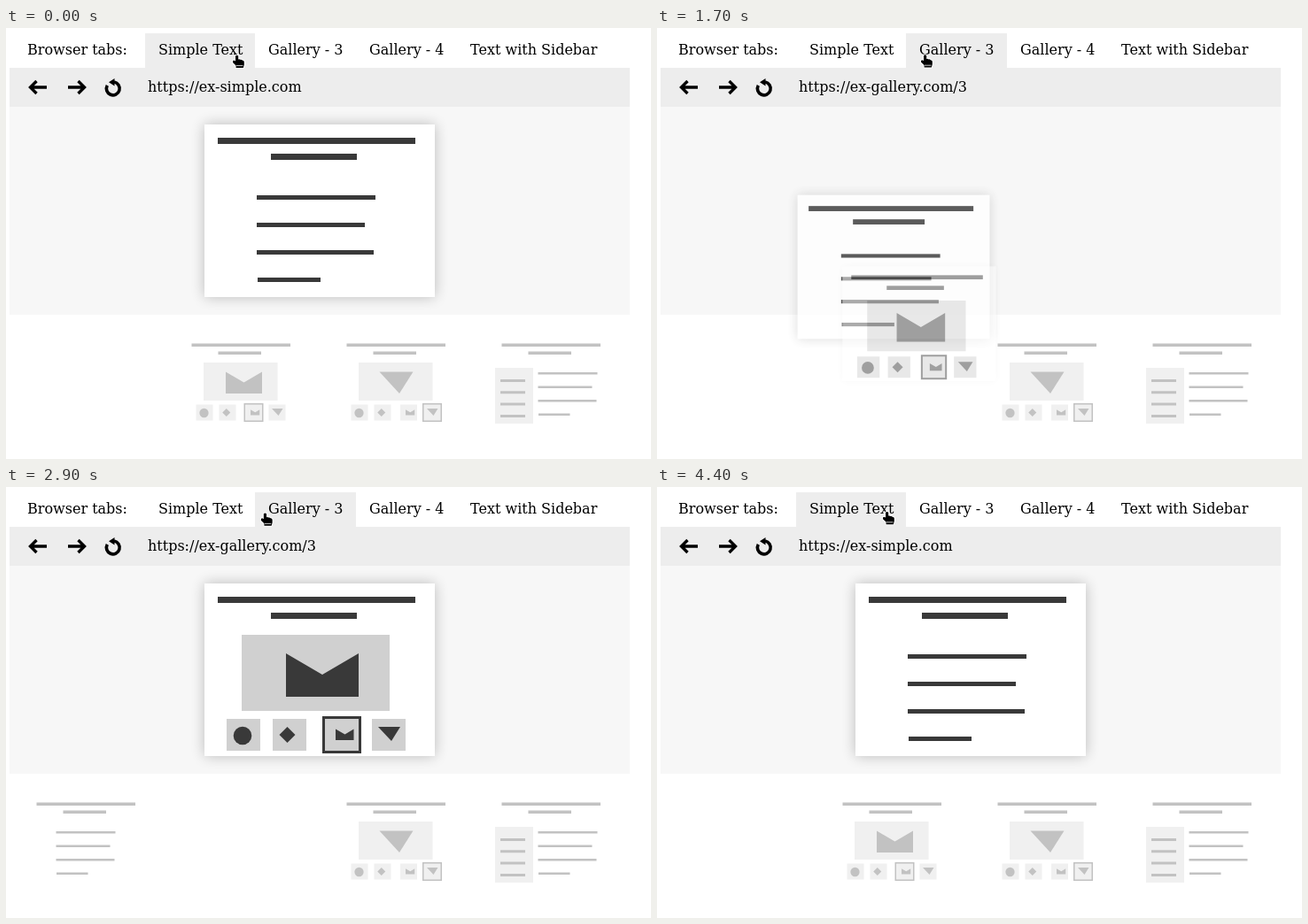
An HTML page for the animation above (5200 ms loop, 728x487 px).

```html
<!DOCTYPE html>
<html lang="en">
<head>
<meta charset="utf-8">
<title>Browser tabs</title>
<style>
  html, body { margin: 0; width: 100%; height: 100%; overflow: hidden; background: #fff; }
  svg, span { position: absolute; left: 0; top: 0; }
  svg { width: 728px; height: 487px; }
  span { font: 16px/20px "DejaVu Serif", "Noto Serif", serif; color: #000; white-space: pre;
    text-rendering: optimizeSpeed; }
</style>
</head>
<body>
<svg viewBox="0 0 728 487">
  <defs>
    <filter id="blur" x="-20%" y="-20%" width="140%" height="140%">
      <feGaussianBlur stdDeviation="8"/>
    </filter>
  </defs>
  <rect id="tab" y="6" height="39" fill="#ededed"/>
  <rect x="4" y="45" width="700" height="44" fill="#ededed"/>
  <rect x="4" y="89" width="700" height="235" fill="#f7f7f7"/>
  <g fill="none" stroke="#000" stroke-width="3.4">
    <path d="M46 67H28M34.5 60L27.5 67L34.5 74"/>
    <path d="M70 67H88M81.5 60L88.5 67L81.5 74"/>
    <path d="M114.3 64.8A7.4 7.4 0 1 0 122 61.1" stroke-width="3.6"/>
    <path d="M122.5 57V65.5L116 61.2Z" fill="#000" stroke="none"/>
  </g>
  <g id="pages"></g>
</svg>
<span style="left:24px;top:15px">Browser tabs:</span>
<span style="left:172px;top:15px">Simple Text</span>
<span style="left:296px;top:15px">Gallery - 3</span>
<span style="left:410px;top:15px">Gallery - 4</span>
<span style="left:524px;top:15px">Text with Sidebar</span>
<span id="url" style="left:160px;top:57px"></span>
<svg viewBox="0 0 728 487">
  <g id="cursor">
    <path d="M6 3.2Q7.6 1.4 9.2 3.2V7Q10.6 6.4 11.6 7.4Q13 7 13.8 8.2Q15.8 8.2 15.8 10V13L14.8 16.6H6.6V14L3 10.6Q2.6 8.2 4.4 8.2L6 9Z"
      fill="#000" stroke="#fff" stroke-width="2" paint-order="stroke" stroke-linejoin="round"/>
    <path d="M7 14.2H14.4" fill="none" stroke="#fff" stroke-width=".8"/>
  </g>
</svg>
<script>
const LOOP = 5200, DARK = '#393939', LIGHT = '#d0d0d0';
const $ = id => document.getElementById(id);

const rect = (x, y, w, h, fill = DARK) =>
  `<rect x="${x}" y="${y}" width="${w}" height="${h}" fill="${fill}"/>`;
const poly = points => `<polygon points="${points}" fill="${DARK}"/>`;

const heading = rect(15, 15, 223, 7) + rect(75, 33, 97, 7);
const lines = x => [134, 122, 132, 71]
  .map((w, i) => rect(x + (i === 3 ? 1 : 0), 80 + 31 * i, w, 5)).join('');

function gallery(chosen) {
  const thumbs = [25, 77, 136, 189].map((x, i) => {
    if (i !== chosen) return rect(x, 153, 38, 36, LIGHT);
    const left = i === 2 ? 134.5 : 187.5;
    return `<rect x="${left}" y="151.5" width="41" height="39" fill="${LIGHT}" stroke="${DARK}" stroke-width="3"/>`;
  }).join('');
  const hero = chosen === 2
    ? poly('92,79 133,103 174,79 174,128 92,128')
    : poly('89,79 165,79 134,128');
  return rect(42, 58, 167, 86, LIGHT) + hero + thumbs +
    `<circle cx="43" cy="172" r="10.3" fill="${DARK}"/>` +
    poly('93.5,162 102.5,171 93.5,180 84.5,171') +
    poly('148,164.5 158.5,170.5 168.5,164.5 168.5,177 148,177') +
    poly('196,162 221,162 211,178');
}

const sidebar = rect(0, 70, 86, 126, LIGHT) +
  [96, 122.5, 149, 176].map(y => rect(12, y, 56, 6)).join('');

const bodies = [lines(59), gallery(2), gallery(3), sidebar + lines(97)];
$('pages').innerHTML = bodies.map(body =>
  `<g><rect width="260" height="195" filter="url(#blur)"/>` +
  `${rect(0, 0, 260, 195, '#fff')}${heading}${body}</g>`).join('');
const pages = [...$('pages').children];

// move and fade: 0 = thumbnail in the row, 1 = open in the browser
function place(i, move, fade) {
  const mix = (a, b, p) => a + (b - a) * p;
  const page = pages[i];
  page.setAttribute('transform',
    `translate(${mix(27 + 175 * i, 224, move)} ${mix(349, 109, move)}) scale(${mix(.5, 1, move)})`);
  page.setAttribute('opacity', mix(.3, 1, fade));
  page.firstChild.setAttribute('opacity', .24 * fade);
}

const path = [
  [400, 253, 28.4], [500, 255, 28.4], [1000, 290, 28], [1200, 295, 28],
  [2800, 295, 28], [3100, 264.5, 25.5], [3200, 264.5, 25.5], [3500, 252, 25.6]
];

function along(t) {
  const next = path.findIndex(k => k[0] > t);
  if (next === 0) return path[0].slice(1);
  if (next < 0) return path[path.length - 1].slice(1);
  const a = path[next - 1], b = path[next];
  const f = (t - a[0]) / (b[0] - a[0]);
  return [1, 2].map(i => a[i] + (b[i] - a[i]) * f);
}

// cubic-bezier(.42, 0, .58, 1), solved by bisection
function easeInOut(x) {
  if (x <= 0) return 0;
  if (x >= 1) return 1;
  const curve = (u, a, b) => 3 * a * u * (1 - u) ** 2 + 3 * b * u * u * (1 - u) + u ** 3;
  let lo = 0, hi = 1;
  for (let i = 0; i < 24; i++) {
    const mid = (lo + hi) / 2;
    if (curve(mid, .42, .58) < x) lo = mid; else hi = mid;
  }
  return curve(lo, 0, 1);
}

function draw(time) {
  // the picture advances in steps, coarser for the way back
  const step = time < 4000 ? 100 : 200;
  const t = Math.floor(time / step) * step;
  const swap = length => easeInOut((t - 1548) / length) - easeInOut((t - 3915) / length);
  const move = swap(380), fade = swap(430);
  place(0, 1 - move, 1 - fade);
  place(1, move, fade);

  const onGallery = t >= 1700 && t < 4200;
  $('tab').setAttribute('x', onGallery ? 281 : 157);
  $('tab').setAttribute('width', onGallery ? 114 : 124);
  $('url').textContent = t >= 1600 && t < 4000
    ? 'https://ex-gallery.com/3' : 'https://ex-simple.com';
  $('cursor').setAttribute('transform', `translate(${along(t).join(' ')})`);
}

place(2, 0, 0);
place(3, 0, 0);
const start = performance.now();
function tick() {
  draw((performance.now() - start) % LOOP);
  requestAnimationFrame(tick);
}
tick();
</script>
</body>
</html>
```
